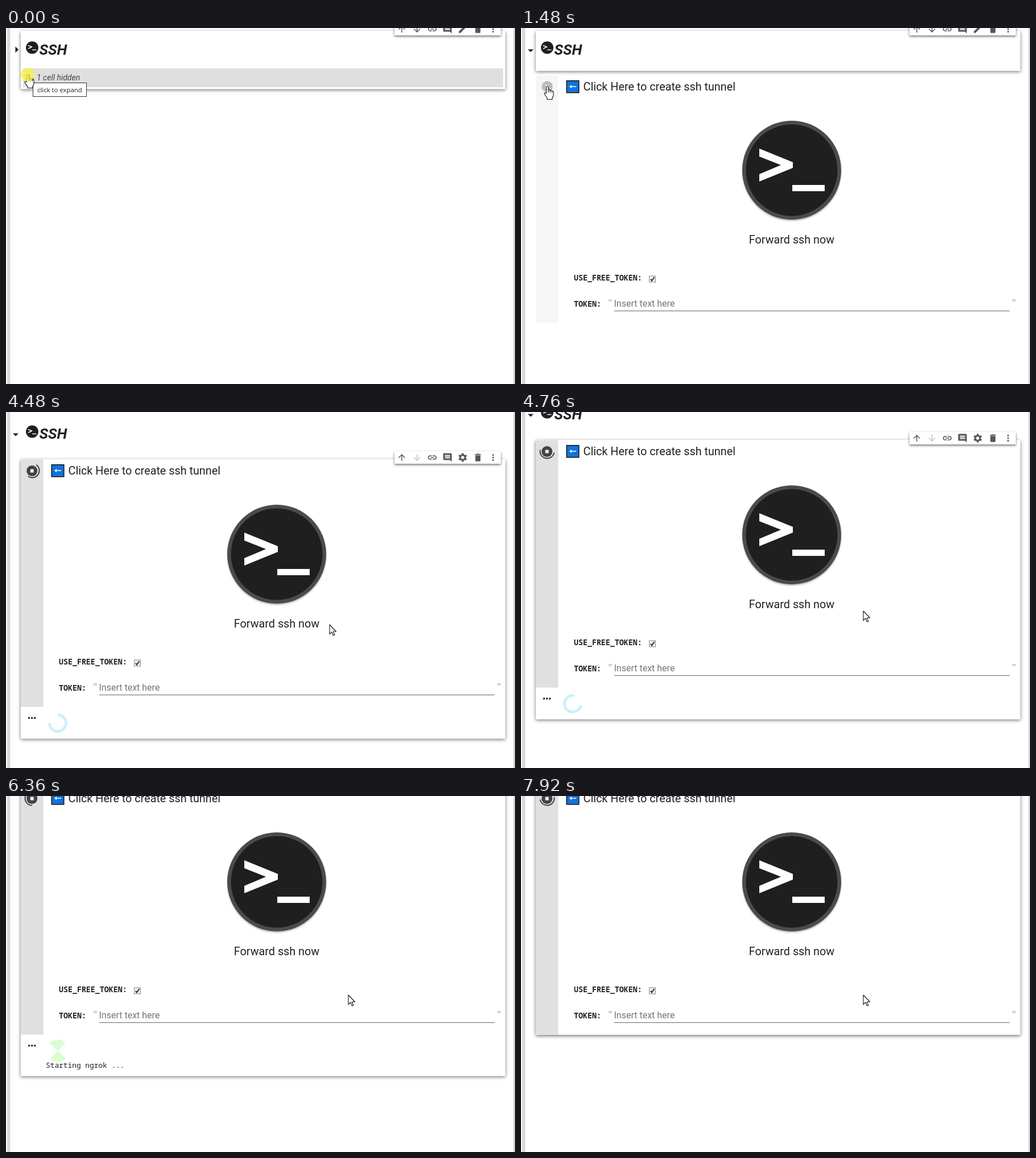
An HTML page with a canvas for the animation above (8000 ms loop, 895 px wide and 626 px high).

```html
<!DOCTYPE html>
<html lang="en">
<head>
<meta charset="utf-8">
<title>SSH tunnel cell</title>
<style>
html, body { margin: 0; width: 100%; height: 100%; overflow: hidden; background: #fff; }
canvas { display: block; width: 895px; height: 626px; }
</style>
</head>
<body>
<canvas id="stage" width="895" height="626"></canvas>
<script>
const ctx = document.getElementById('stage').getContext('2d');
const LOOP = 8000, STEP = 40, TAU = Math.PI * 2;
const INK = '#212121', ICON = '#555', DARK = '#424242';
const SANS = 'Roboto, sans-serif', MONO = '"Noto Sans Mono", monospace';

const HAND = new Path2D('M-1.5 13V1.8Q-1.5 .5 .2 .5T2 1.8V7.4Q2 6.3 3.5 6.4T5.2 7.8V8.6Q5.2 7.4 6.7 7.5T8.3 9V9.6Q8.3 8.6 9.6 8.8T11 10.4V16Q11 18.5 9 20.5V23.5H0V21Q-3 17-4.8 13.8Q-5 11.8-3.6 11.7Q-2.4 11.8-1.5 13Z');
const FINGERS = new Path2D('M2 7.4V11.5M5.2 8.4V11.5M8.3 9.4V11.5');
const ARROW = new Path2D('M0 0V16.5L3.8 12.9L6.4 19L8.8 18L6.2 12H11.5Z');

const ICONS = {
  up: new Path2D('M4 12l1.4 1.4L11 7.8V20h2V7.8l5.6 5.6L20 12l-8-8z'),
  down: new Path2D('M20 12l-1.4-1.4L13 16.2V4h-2v12.2l-5.6-5.6L4 12l8 8z'),
  comment: new Path2D('M22 4q0-2-2-2H4Q2 2 2 4v12q0 2 2 2h14l4 4zM18 14H6v-2h12zM18 11H6V9h12zM18 8H6V6h12z'),
  pencil: new Path2D('M3 17.3V21h3.7L17.8 9.9l-3.7-3.7zM20.7 7q.7-.7 0-1.4l-2.3-2.3q-.7-.7-1.4 0l-1.9 1.8 3.8 3.8z'),
  bin: new Path2D('M6 19q0 2 2 2h8q2 0 2-2V7H6zM19 4h-3.5l-1-1h-5l-1 1H5v2h14z')
};

// Keyframes are [time, ...values].
const CURSOR = [[0, 38, 82], [400, 38, 82], [840, 88, 174], [960, 88, 174], [1480, 46, 102],
  [3760, 46, 102], [3920, 218, 171], [4080, 218, 171], [4400, 569, 374], [4560, 569, 374], [4720, 602, 350]];
const RING = [[3480, -80], [3760, -80], [3920, -46], [4080, -46], [4480, 35], [5480, 270],
  [6360, 540], [7480, 755], [7680, 755], [7920, 800]];
const SCROLL = [[4680, 0], [4760, 34], [4800, 66], [4840, 88], [4880, 99]];

function tween(keys, t) {
  if (t <= keys[0][0]) return keys[0].slice(1);
  for (let i = 1; i < keys.length; i++) {
    const [a, b] = [keys[i - 1], keys[i]];
    if (t < b[0]) {
      const p = (t - a[0]) / (b[0] - a[0]);
      return a.slice(1).map((v, k) => v + (b[k + 1] - v) * p);
    }
  }
  return keys[keys.length - 1].slice(1);
}

const within = (t, from, to) => t >= from && t < to;
const rad = deg => deg * Math.PI / 180;

function rect(x, y, w, h, color) {
  ctx.fillStyle = color;
  ctx.fillRect(x, y, w, h);
}

function disc(x, y, r, color) {
  ctx.fillStyle = color;
  ctx.beginPath();
  ctx.arc(x, y, r, 0, TAU);
  ctx.fill();
}

function arc(x, y, r, from, to, width, color) {
  ctx.strokeStyle = color;
  ctx.lineWidth = width;
  ctx.beginPath();
  ctx.arc(x, y, r, rad(from), rad(to));
  ctx.stroke();
}

function poly(points, color) {
  ctx.fillStyle = color;
  ctx.beginPath();
  points.forEach(([x, y]) => ctx.lineTo(x, y));
  ctx.fill();
}

function line(points, width, color) {
  ctx.strokeStyle = color;
  ctx.lineWidth = width;
  ctx.beginPath();
  points.forEach(([x, y], i) => i ? ctx.lineTo(x, y) : ctx.moveTo(x, y));
  ctx.stroke();
}

function text(str, x, y, font, color = INK, align = 'left') {
  ctx.font = font;
  ctx.fillStyle = color;
  ctx.textAlign = align;
  ctx.fillText(str, x, y);
}

function card(x, y, w, h, blur = 6) {
  ctx.save();
  ctx.shadowColor = 'rgba(0,0,0,.55)';
  ctx.shadowBlur = blur;
  ctx.shadowOffsetY = 1.5;
  rect(x, y, w, h, '#fff');
  ctx.restore();
}

function terminal(x, y, r) {
  const k = r / 87;
  ctx.save();
  ctx.translate(x, y);
  ctx.scale(k, k);
  if (r > 20) {
    ctx.shadowColor = 'rgba(0,0,0,.3)';
    ctx.shadowBlur = 3;
    ctx.shadowOffsetY = 2;
  }
  disc(0, 0, 87, r > 20 ? '#4b4b4b' : '#2a2a2a');
  ctx.shadowColor = 'transparent';
  disc(0, 0, 80.5, '#1f1f1f');
  poly([[-57, -38], [2, -14], [2, -4], [-57, 20], [-57, 7], [-19, -9], [-57, -24]], '#fff');
  rect(1, 26, 57, 11, '#fff');
  ctx.restore();
}

function gear() {
  ctx.beginPath();
  ctx.arc(12, 12, 5.6, 0, TAU);
  ctx.lineWidth = 4;
  ctx.stroke();
  for (let i = 0; i < 6; i++) {
    const a = rad(i * 60 + 30);
    line([[12 + 6 * Math.cos(a), 12 + 6 * Math.sin(a)], [12 + 10 * Math.cos(a), 12 + 10 * Math.sin(a)]], 4.6, ICON);
  }
}

function link() {
  ctx.lineWidth = 2;
  ctx.beginPath();
  ctx.arc(7, 12, 4, rad(90), rad(270));
  ctx.moveTo(7, 8); ctx.lineTo(11, 8);
  ctx.moveTo(7, 16); ctx.lineTo(11, 16);
  ctx.moveTo(8, 12); ctx.lineTo(16, 12);
  ctx.moveTo(13, 8); ctx.lineTo(17, 8);
  ctx.arc(17, 12, 4, rad(-90), rad(90));
  ctx.lineTo(13, 16);
  ctx.stroke();
}

function toolbar(cy, names) {
  card(683, cy - 11, 187, 22, 4);
  names.forEach((name, i) => {
    ctx.save();
    ctx.translate(696 + i * 26.75 - 9, cy - 9);
    ctx.scale(.75, .75);
    ctx.fillStyle = ctx.strokeStyle = name === 'down' && names.includes('gear') ? '#c4c4c4' : ICON;
    if (name === 'gear') gear();
    else if (name === 'link') link();
    else if (name === 'more') [6, 12, 18].forEach(y => disc(12, y, 2, ICON));
    else ctx.fill(ICONS[name], 'evenodd');
    ctx.restore();
  });
}

function heading(open) {
  poly(open ? [[12, 37.5], [22, 37.5], [17, 42.5]] : [[16.5, 32.5], [22, 38], [16.5, 43.5]], INK);
  terminal(46, 34.5, 11);
  text('SSH', 58.5, 46.5, `italic 700 26px ${SANS}`);
}

function hiddenBar() {
  rect(30, 71, 844, 33, '#dfdfdf');
  line([[41, 81], [41, 90], [48, 90]], 1.2, DARK);
  poly([[46, 87], [49.5, 90], [46, 93]], DARK);
  text('1 cell hidden', 54, 92, `italic 14px ${SANS}`, '#444');
}

function runButton(t) {
  if (t < 3040) {
    disc(46, 103, 9.7, '#bbb');
    poly([[43.5, 99], [49.5, 103], [43.5, 107]], '#f5f7f7');
  } else if (t < 3480) {
    disc(46, 102.5, 9.7, DARK);
    poly([[43.5, 98.5], [49.5, 102.5], [43.5, 106.5]], '#e0e0e0');
    ctx.setLineDash([7, 3.2]);
    arc(46, 102.5, 13, -10, 350, 2, DARK);
    ctx.setLineDash([]);
  } else {
    const [mid] = tween(RING, t);
    disc(45.7, 103.5, 9.5, DARK);
    rect(42.7, 100.5, 6, 6, '#eee');
    arc(46, 103, 12.5, mid - 90, mid + 90, 2, DARK);
  }
}

function form() {
  rect(79.5, 92, 23, 22.5, '#111');
  rect(81, 93.5, 20, 19.5, '#1273dc');
  line([[87, 103], [97, 103]], 1.5, '#fff');
  poly([[85, 103], [89, 100], [89, 106]], '#fff');
  text('Click Here to create ssh tunnel', 109.5, 110, `19.8px ${SANS}`);
  terminal(476, 250, 87);
  text('Forward ssh now', 476, 379, `19.8px ${SANS}`, INK, 'center');

  const label = `700 13.3px ${MONO}`;
  text('USE_FREE_TOKEN:', 93, 444, label);
  rect(225, 435.5, 12, 12, '#8d8d8d');
  rect(226, 436.5, 10, 10, '#ececec');
  line([[228, 441.5], [230, 444.5], [234.5, 438]], 2, '#333');
  text('TOKEN:', 93, 490, label);
  text('"', 152, 489, `16px ${MONO}`, '#999');
  text('"', 862, 489, `16px ${MONO}`, '#999');
  text('Insert text here', 163.5, 490, `16px ${SANS}`, '#757575');
  rect(164, 497, 695, 1, '#666');
}

function rolling(t) {
  const start = -90 + (t - 4480) * .36;
  arc(91, 547, 14.5, start, start + 270, 5, '#cdeffc');
}

function wedges(t) {
  const s = (Math.min(t, 7480) - 4860) / 1000;
  ctx.fillStyle = '#dafdd0';
  [.75, 1, 1.5, 3].forEach(period => {
    const a = rad(-137 + s * 360 / period);
    ctx.beginPath();
    ctx.moveTo(91, 547);
    ctx.arc(91, 547, 19.5, a, a + TAU / 4);
    ctx.fill();
  });
}

function cellBottom(t) {
  if (t < 4120 || t >= 7880) return 519;
  if (t < 5480) return 574.5;
  return within(t, 5560, 7720) ? 591.5 : 552;
}

function cell(t) {
  const focused = t >= 3040, bottom = cellBottom(t);
  if (focused) card(26, 83, 852, bottom - 83);
  rect(26, 83.5, 39.5, 435, focused ? '#e0e0e0' : '#f5f7f7');
  runButton(t);
  form();
  if (bottom > 519) [40.5, 45.7, 50.8].forEach(x => disc(x, 538, 1.8, INK));
  if (within(t, 4120, 5480)) rolling(t);
  if (within(t, 5560, 7720)) {
    wedges(t);
    text('Starting ngrok ...', 70, 577, `12.83px ${MONO}`);
  }
}

function pointer(t) {
  const [x, y] = tween(CURSOR, t);
  const hand = t < 320 || within(t, 1360, 2120) || within(t, 2280, 3760);
  ctx.save();
  ctx.translate(x, y);
  ctx.fillStyle = '#fff';
  ctx.strokeStyle = '#111';
  ctx.lineWidth = 1.1;
  ctx.lineJoin = 'round';
  ctx.fill(hand ? HAND : ARROW);
  ctx.stroke(hand ? HAND : ARROW);
  if (hand) ctx.stroke(FINGERS);
  if (t < 40 || within(t, 1840, 1920)) disc(0, 0, 12, 'rgba(250,243,60,.75)');
  ctx.restore();
}

function draw(t) {
  const open = t >= 240;
  rect(0, 0, 895, 626, '#fff');
  rect(2, 0, 5.5, 626, '#d9d9d9');
  rect(892, 0, 3, 626, '#d9d9d9');

  ctx.save();
  ctx.translate(0, -Math.round(tween(SCROLL, t)[0]));
  if (t < 3040) card(26, 5, 852, open ? 70.5 : 102.5);
  heading(open);
  if (open) cell(t);
  else hiddenBar();
  if (t < 3040) toolbar(2, ['up', 'down', 'link', 'comment', 'pencil', 'bin', 'more']);
  else toolbar(80, ['up', 'down', 'link', 'comment', 'gear', 'bin', 'more']);
  ctx.restore();

  if (t < 200) {
    rect(47, 96, 95, 25, '#333');
    rect(48, 97, 93, 23, '#fff');
    text('click to expand', 55, 113, '11.4px "Open Sans", sans-serif', '#222');
  }
  pointer(t);
}

const began = performance.now();
function frame() {
  const t = (performance.now() - began) % LOOP;
  draw(Math.floor(t / STEP) * STEP);
  requestAnimationFrame(frame);
}
frame();
</script>
</body>
</html>
```
